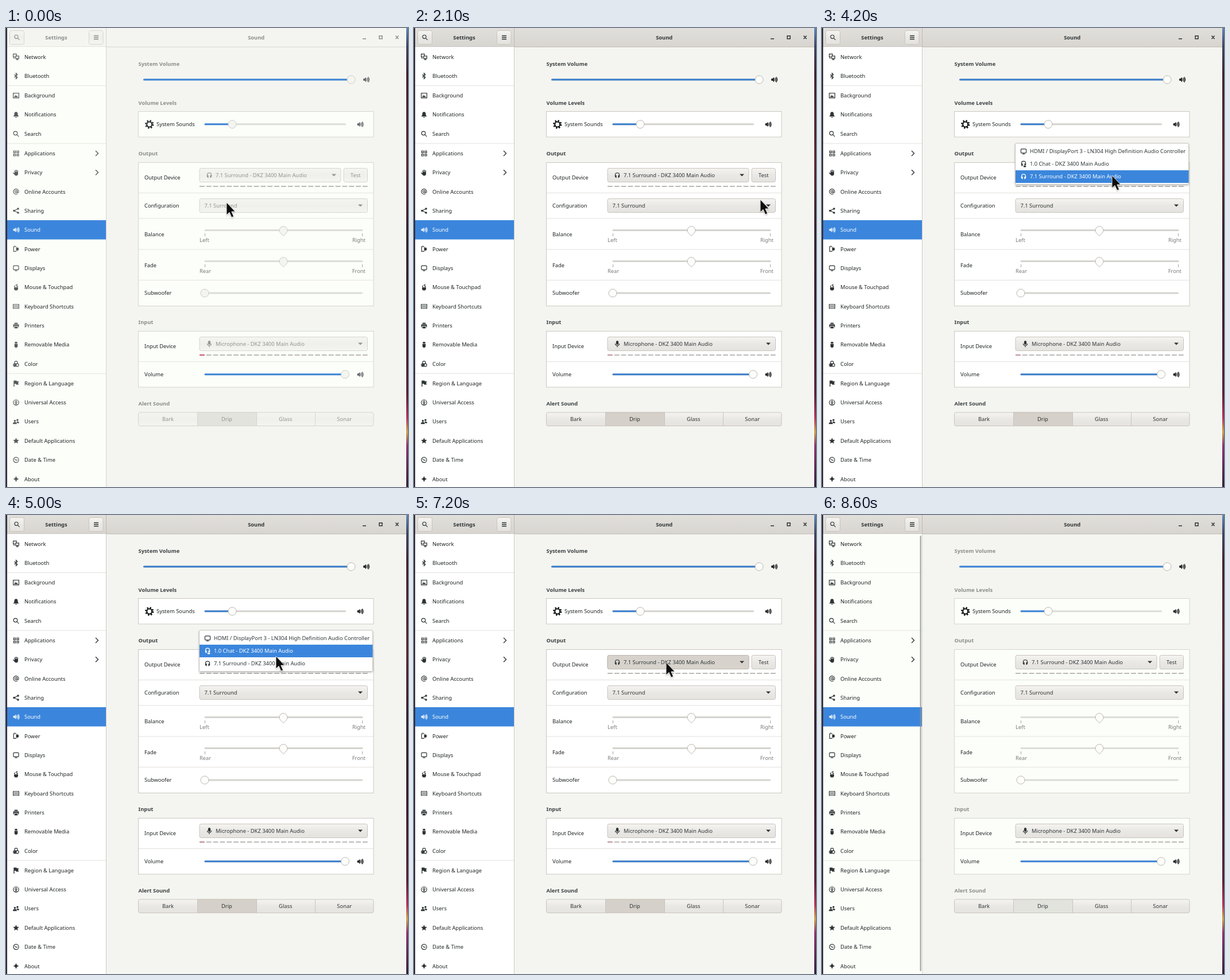
These frames come from a looping animation (700x800 px, 8.7 s). An HTML page:

```html
<!DOCTYPE html>
<html lang="en">
<head>
<meta charset="utf-8">
<title>Sound settings</title>
<style>
html, body { margin: 0; width: 100%; height: 100%; overflow: hidden; }
svg { display: block; width: 700px; height: 800px; }
text { font: 9.35px "Noto Sans", "Open Sans", sans-serif; white-space: pre; }
.bold { font-weight: 700; }
.line { fill: none; stroke: currentColor; stroke-width: 1.7; }
.solid { fill: currentColor; }
</style>
</head>
<body>
<svg id="stage" viewBox="0 0 700 800" xmlns="http://www.w3.org/2000/svg"></svg>
<script>
const stage = document.getElementById('stage');
const LOOP = 8700, STEP = 100, FOCUS = 1500, BLUR = 8500;
const BLUE = '#3b86dc';

// [focused, unfocused, late]: late colours change after the others on blur
const palette = {
  headTop: ['#e1dfdb', '#f4f5f0', 1], headLow: ['#d8d5d0', '#f4f5f0', 1],
  headLine: ['#bfb9b2', '#d5d5cf', 1], headText: ['#2e3436', '#8b8e8d', 1],
  btnTop: ['#f5f4f1', '#f4f5f0', 1], btnLow: ['#e5e3df', '#f4f5f0', 1],
  btnLine: ['#c9c4bd', '#d5d5cf', 1], btnText: ['#2e3436', '#929590', 1],
  combo: ['#eae8e4', '#eff0eb', 1], icon: ['#2e3436', '#565b5b', 1],
  tool: ['#1c1f20', '#62676a', 1], gear: ['#111313', '#2b2e2f', 1],
  knob: ['#fdfdfb', '#f4f5f0', 1], knobLine: ['#bcb7b0', '#cdcec8', 1],
  title: ['#3b4042', '#8b8e8b', 0], side: ['#ffffff', '#fcfef9', 0],
  trough: ['#d4d3cf', '#dcddd7', 0], drip: ['#d5d0c9', '#e2e3dd', 0],
  card: ['#cdc8c1', '#d5d5cf', 0], rule: ['#e3e1dd', '#e4e5df', 0],
  fill: ['#3a7dcb', '#3c84d8', 0]
};

const solid = d => `<path class="solid" d="${d}"/>`;
const line = d => `<path class="line" d="${d}"/>`;
const dot = (x, y, r) => `<circle class="solid" cx="${x}" cy="${y}" r="${r}"/>`;
const ring = (x, y, r) => `<circle class="line" cx="${x}" cy="${y}" r="${r}"/>`;

// All drawn on a 16-unit grid
const icons = {
  network: line('M5 8H1V1h8v4M7 6h8v6H7zM11 12v3M8 15h6M1 11h4'),
  bluetooth: line('M3.5 4.5l8 7L8 15V1l3.5 3.5-8 7'),
  background: line('M1 2h14v12H1z') + solid('M3 12l3-5 2 2 2-1 3 4z') + dot(5, 5, 1),
  bell: solid('M8 1C4 1 3.6 4 3.5 9L1 12.5h14L12.500 9C12.400 4 12 1 8 1zM6 13.500h4a2 2 0 0 1-4 0z'),
  search: ring(6.5, 6.5, 4.7) + line('M10 10l5 5'),
  apps: line('M2 2h4.500v4.500H2zM10 2h4.500v4.500H10zM2 10h4.500v4.500H2zM10 10h4.500v4.500H10z'),
  hand: solid('M4 3h1.500v4h1V1H8v6h1V1.500h1.500V7h1V3H13v8q0 5-5 5-3 0-4.500-3L0 9l1-1 3 2z'),
  at: ring(8, 8, 2.7) + line('M10.700 5v4.500q0 1.500 1.800 1.500 2-.5 2-3A6.500 6.500 0 1 0 11.500 13.500'),
  share: dot(3, 8, 2.6) + dot(13, 3, 2.6) + dot(13, 13, 2.6) + line('M13 3L3 8l10 5'),
  speaker: solid('M1 5.500h3L8 2v12L4 10.500H1z') +
    line('M9.500 5q2.500 3 0 6M11.500 3q4.500 5 0 10M13.500 1.500q5 6.500 0 13'),
  power: line('M9 2H2v12h7M5 2V0M9 5h2q3 0 3 3t-3 3H9z') + solid('M9 5h4v6H9z'),
  display: `<rect class="line" x="1.500" y="2" width="13" height="10" rx="1.500"/>` + line('M5 14.500h6'),
  mouse: solid('M3 8h10v3q0 5-5 5t-5-5zM3 7q0-3 3-3.500V7zM9 7V3.500Q13 4 13 7z') + line('M8 4q0-3 4-3'),
  keyboard: line('M1 3h14v10H1z') + line('M3 6.500h10M3 9.500h10').replace('/>', ' stroke-dasharray="2 .7"/>'),
  printer: solid('M4 1h8v3H4zM1 5h14v7h-2V9H3v3H1zM4 10.500h8V15H4z'),
  media: solid('M5 1h6v4H5zM4 6h8v6q0 3-4 3.500Q4 15 4 12z'),
  color: ring(8, 5, 3.6) + ring(5, 11, 3.6) + ring(11, 11, 3.6) + dot(5, 11, 2.5),
  flag: solid('M2 1h7l1 2h5l-2 4 2 4H8L7 9H4v7H2z'),
  access: ring(8, 8, 6.7) + dot(8, 4.5, 1.4) + line('M4 7h8M8 7v3M6 13l2-4 2 4'),
  users: dot(5, 6, 2.5) + dot(11.5, 4, 2.4) + solid('M0 14q0-5 5-5t5 5zM9 8q6-2 7 4h-5z'),
  star: solid('M8 .5l2.200 5 5.300.5-4 3.600 1.200 5.500L8 12.200 3.300 15l1.200-5.400L.5 6l5.300-.5z'),
  clock: ring(8, 8, 6.5) + line('M4.500 6L8 9l3.500-.5'),
  spark: solid('M8 0q1 7 8 8-7 1-8 8-1-7-8-8 7-1 8-8z'),
  phones: line('M3 11V7a5 5 0 0 1 10 0v4') + solid('M2 8h4v6H4L2 11zM14 8h-4v6h2l2-3z'),
  headset: line('M3 10V6a5 5 0 0 1 10 0v4') + solid('M2 7h4v6H3zM14 7h-4v4h4zM8 12h6v4H8z'),
  mic: `<rect class="solid" x="5" y="0" width="6" height="10" rx="3"/>` + line('M3 7q0 5 5 5t5-5M8 12v4')
};
const icon = (name, x, y, color = 'var(--tool)', size = 11.2) =>
  `<g transform="translate(${x - size / 2} ${y - size / 2}) scale(${size / 16})" style="color:${color}">${icons[name]}</g>`;
const text = (s, x, y, color = '#1f2324', extra = '') =>
  `<text x="${x}" y="${y + 3.4}" style="fill:${color}" ${extra}>${s}</text>`;
const mid = 'text-anchor="middle"';
const rect = (x, y, w, h, fill, stroke = 'none', rx = 0, extra = '') =>
  `<rect x="${x}" y="${y}" width="${w}" height="${h}" rx="${rx}" style="fill:${fill};stroke:${stroke}" ${extra}/>`;
const rule = (x, y, w, color = 'var(--rule)') => rect(x, y, w, 1, color);
const heading = (s, y) => text(s, 230.5, y, 'var(--title)', 'class="bold"');
const card = (y, h) => rect(230.5, y, 409.5, h, 'var(--side)', 'var(--card)');
const button = (x, y, w, h = 24) => rect(x, y, w, h, 'url(#btn)', 'var(--btnLine)', 3);
const arrow = (x, y) => `<path d="M${x - 4} ${y - 2}h8l-4 4z" style="fill:var(--btnText)"/>`;
const round = (x, y) =>
  `<circle cx="${x}" cy="${y}" r="7" style="fill:var(--knob);stroke:var(--knobLine)"/>`;

function slider(x0, x1, y, value, filled = true) {
  return rect(x0, y - 1.5, x1 - x0, 3, 'var(--trough)', 'none', 1.5) +
    (filled ? rect(x0, y - 1.5, value - x0, 3, 'var(--fill)', 'none', 1.5) : '') + round(value, y);
}
function balance(y, left, right) {
  const pin = `<path d="M478.500 ${y + 5.500}A7 7 0 1 1 487.500 ${y + 5.500}L483 ${y + 10}z"
    style="fill:var(--knob);stroke:var(--knobLine)"/>`;
  return rect(345.5, y - 1.5, 276, 3, 'var(--trough)', 'none', 1.5) +
    rect(346, y + 5.5, 1, 5, '#a5a7a3') + rect(620, y + 5.5, 1, 5, '#a5a7a3') + pin +
    text(left, 337, y + 17, '#797c79') + text(right, 626, y + 17, '#797c79', 'text-anchor="end"');
}
const meter = y => Array.from({ length: 25 }, (_, i) =>
  rect(337 + i * 11.83, y - 1, 8.8, 2, '#bcbab6', 'none', 0, i || y < 400 ? '' : 'id="level"')).join('');

const rows = [
  ['network', 'Network'], ['bluetooth', 'Bluetooth'], ['background', 'Background'],
  ['bell', 'Notifications'], ['search', 'Search'], ['apps', 'Applications'], ['hand', 'Privacy'],
  ['at', 'Online Accounts'], ['share', 'Sharing'], ['speaker', 'Sound'], ['power', 'Power'],
  ['display', 'Displays'], ['mouse', 'Mouse &amp; Touchpad'], ['keyboard', 'Keyboard Shortcuts'],
  ['printer', 'Printers'], ['media', 'Removable Media'], ['color', 'Color'],
  ['flag', 'Region &amp; Language'], ['access', 'Universal Access'], ['users', 'Users'],
  ['star', 'Default Applications'], ['clock', 'Date &amp; Time'], ['spark', 'About']
];
function sidebar() {
  let out = rect(2, 33, 172, 767, 'var(--side)');
  let y = 50.3;
  rows.forEach(([name, label], i) => {
    const on = label === 'Sound';
    if (on) out += rect(2, 335, 172, 33.5, BLUE);
    out += icon(name, 17.5, y, on ? '#e4effb' : 'var(--icon)') + text(label, 32, y, on ? '#fff' : '#1f2324');
    if (i === 5 || i === 6)
      out += `<path d="M156 ${y - 4.500}l4.500 4.500-4.500 4.500" class="line" style="color:var(--icon);stroke-width:1.400"/>`;
    if (i === 1 || i === 4 || i === 16) {
      out += rule(2, y + 16.3, 172, 'var(--rule)');
      y += 0.7;
    }
    y += 33.35;
  });
  return out + rect(174, 33, 1, 767, 'var(--card)') +
    rect(170.5, 36, 2.5, 759, '#8d9191', 'none', 1, 'id="scrollbar" opacity=".7"');
}
function header() {
  return rect(2, 0, 695, 33, 'url(#head)') + rule(2, 32.5, 695, 'var(--headLine)') +
    rect(174, 0, 1, 33, 'var(--headLine)') + button(6.5, 4.5, 25) + button(144.5, 4.5, 24.5) +
    icon('search', 19, 16.3, 'var(--headText)', 10.5) +
    `<path d="M153 13.500h8M153 16.500h8M153 19.500h8" style="stroke:var(--headText);stroke-width:1.300"/>` +
    text('Settings', 87.5, 16.3, 'var(--headText)', mid + ' class="bold"') +
    text('Sound', 435.7, 16.3, 'var(--headText)', mid + ' class="bold"') +
    `<path d="M621 18.700h6M650 13.700h5v5h-5zM678.500 13.500l5 5.500M683.500 13.500l-5 5.500" class="line"
      style="color:var(--headText);stroke-width:1.500"/>`;
}
function output() {
  return heading('Output', 219) + card(234.5, 250) +
    [287, 331.5, 385.5, 439].map(y => rule(231, y, 409)).join('') +
    text('Output Device', 241, 261) + button(337, 244.5, 246) +
    rect(337, 244.5, 246, 24, '#d7d3cc', '#bdb8b0', 3, 'id="pressed"') +
    icon('phones', 354, 256.7, 'var(--btnText)') +
    text('7.1 Surround - DKZ 3400 Main Audio', 365, 257, 'var(--btnText)') + arrow(571, 256.5) +
    button(588, 244.5, 41.5) + text('Test', 608.7, 257, 'var(--btnText)', mid) + meter(276) +
    text('Configuration', 241, 310) + button(337, 297.5, 292.5) +
    text('7.1 Surround', 345.5, 310, 'var(--btnText)') + arrow(617, 309.5) +
    text('Balance', 241, 359.3) + balance(352.5, 'Left', 'Right') +
    text('Fade', 241, 413.3) + balance(406.5, 'Rear', 'Front') +
    text('Subwoofer', 241, 462) + slider(346, 621, 462, 346, false);
}
function input() {
  return heading('Input', 513) + card(528.5, 97.5) + rule(231, 581, 409) +
    text('Input Device', 241, 555) + button(337, 538.5, 292.5) + icon('mic', 354, 550.7, 'var(--btnText)') +
    text('Microphone - DKZ 3400 Main Audio', 365, 551, 'var(--btnText)') + arrow(617, 550.5) + meter(570) +
    text('Volume', 241, 604) + slider(345.5, 592, 603.7, 590.5) + icon('speaker', 616.5, 604);
}
function alerts() {
  const names = ['Bark', 'Drip', 'Glass', 'Sonar'];
  return heading('Alert Sound', 655) + button(230.5, 670, 409.5, 23.5) +
    rect(333.5, 670, 103, 23.5, 'var(--drip)', 'var(--btnLine)') + rect(538, 670, 1, 23.5, 'var(--btnLine)') +
    names.map((s, i) => text(s, 282 + i * 102.4, 682, 'var(--btnText)', mid)).join('');
}
function popup(id, y, items) {
  const list = items.map(([name, label], i) => {
    const cy = y + 14 + i * 22;
    return `<g class="item">${rect(337, cy - 11, 301.5, 22, BLUE, 'none', 0, 'class="hit"')}` +
      (name ? icon(name, 351, cy, 'inherit') : '') + text(label, name ? 362 : 345.5, cy, 'currentColor') + '</g>';
  }).join('');
  return `<g id="${id}">${rect(336.5, y, 302, 27.5 + items.length * 22 - 22, '#fff', '#c8c4bd', 2, 'filter="url(#shade)"')}${list}</g>`;
}

const grad = (id, stops) => `<linearGradient id="${id}" x2="0" y2="1">${stops.map(([o, c]) =>
  `<stop offset="${o}" style="stop-color:${c}"/>`).join('')}</linearGradient>`;

stage.innerHTML = `<defs>
  ${grad('head', [[0, 'var(--headTop)'], [1, 'var(--headLow)']])}
  ${grad('btn', [[0, 'var(--btnTop)'], [0.5, 'var(--combo)'], [1, 'var(--btnLow)']])}
  ${grad('desk', [[0, '#5a86b8'], [0.04, '#38405e'], [0.1, '#3a1d2c'], [0.3, '#57202c'], [0.45, '#2b1b2a'],
    [0.62, '#33162a'], [0.8, '#561b34'], [0.85, '#b1305a'], [0.88, '#c8a24a'], [0.91, '#8a2f6e'], [1, '#2a1c38']])}
  <filter id="shade" x="-10%" y="-30%" width="120%" height="170%">
    <feDropShadow dx="0" dy="1.500" stdDeviation="1.500" flood-opacity=".25"/></filter>
  </defs>` +
  rect(0, 0, 3, 800, '#2b2838') + rect(697, 0, 3, 800, 'url(#desk)') + rect(2, 0, 695, 800, '#f4f5f0') +
  header() + sidebar() +
  heading('System Volume', 63) + slider(239, 605, 90, 601) + icon('speaker', 627, 90) +
  heading('Volume Levels', 130.5) + card(145.5, 44.5) +
  `<g fill="none" style="stroke:var(--gear)"><circle cx="249.700" cy="168" r="4.500" stroke-width="2.200"/>
    <circle cx="249.700" cy="168" r="6.500" stroke-width="2.400" stroke-dasharray="2.400 2.705"/></g>` +
  text('System Sounds', 262, 168) + slider(345.5, 592, 167.8, 394) + icon('speaker', 616.5, 168) +
  output() + input() + alerts() +
  popup('profiles', 296, [['', '7.1 Surround']]) +
  popup('devices', 201, [['display', 'HDMI / DisplayPort 3 - LN304 High Definition Audio Controller'],
    ['headset', '1.0 Chat - DKZ 3400 Main Audio'], ['phones', '7.1 Surround - DKZ 3400 Main Audio']]) +
  `<path id="cursor" d="M0 0V22l5-4.700 3.800 8.700 3.700-1.600-3.700-8.400h6.400z" fill="#090909" stroke="#fff"
    stroke-width=".8" filter="url(#shade)"/>`;

const $ = id => document.getElementById(id);
const cursorPath = [
  [200, 384, 304], [700, 420, 305], [1000, 468, 304], [1100, 499, 303], [1200, 549, 296],
  [1400, 600, 297], [2100, 603, 299], [2900, 600, 305], [3100, 600, 303], [3800, 520, 266],
  [3900, 505, 257], [4700, 505, 257], [5000, 470, 246], [5400, 420, 256], [5800, 390, 248],
  [6100, 366, 242], [6500, 380, 245], [6800, 420, 258], [7000, 439, 257], [7400, 439, 257],
  [7700, 330, 200], [8000, 160, 90], [8300, 44, 3], [8400, 20, -60]
];
const levels = [[0, 0.8], [100, 0.75], [1200, 1], [1500, 0.8], [2100, 0.3], [4200, 0.3],
  [6100, 0.55], [7200, 0.3], [8500, 0]];

function along(keys, t, col = 1) {
  const next = keys.findIndex(k => k[0] > t);
  if (next < 0) return keys[keys.length - 1][col];
  if (next === 0) return keys[0][col];
  const a = keys[next - 1], b = keys[next];
  return a[col] + (b[col] - a[col]) * (t - a[0]) / (b[0] - a[0]);
}
function mix(a, b, k) {
  const part = (s, i) => parseInt(s.slice(i, i + 2), 16);
  return `rgb(${[1, 3, 5].map(i => Math.round(part(a, i) + (part(b, i) - part(a, i)) * k))})`;
}
const show = (id, on) => { $(id).style.display = on ? '' : 'none'; };
const within = (t, a, b) => t >= a && t < b;

function highlight(id, row) {
  $(id).querySelectorAll('.item').forEach((item, i) => {
    item.style.color = i === row ? '#fff' : '#2e3436';
    item.querySelector('.hit').style.opacity = i === row ? 1 : 0;
  });
}
function draw(t) {
  const faded = Math.max(0, Math.min(1, 1 - (t - FOCUS) / 200));
  for (const [name, [on, off, late]] of Object.entries(palette))
    stage.style.setProperty('--' + name, mix(on, off, t >= BLUR && !late ? 1 : faded));
  const x = along(cursorPath, t), y = along(cursorPath, t, 2);
  $('cursor').setAttribute('transform', `translate(${x} ${y})`);
  $('level').style.fill = mix('#bcbab6', '#c23c55', along(levels, t));
  show('scrollbar', t >= 8000);
  show('pressed', within(t, 4000, 4100) || within(t, 6900, 7400));
  show('profiles', within(t, 2300, 2800));
  show('devices', within(t, 4100, 7000));
  highlight('profiles', 0);
  highlight('devices', y < 248 ? 1 : 2);
}
const start = performance.now();
function tick() {
  const t = (performance.now() - start) % LOOP;
  draw(Math.floor(t / STEP) * STEP);
  requestAnimationFrame(tick);
}
tick();
</script>
</body>
</html>
```
